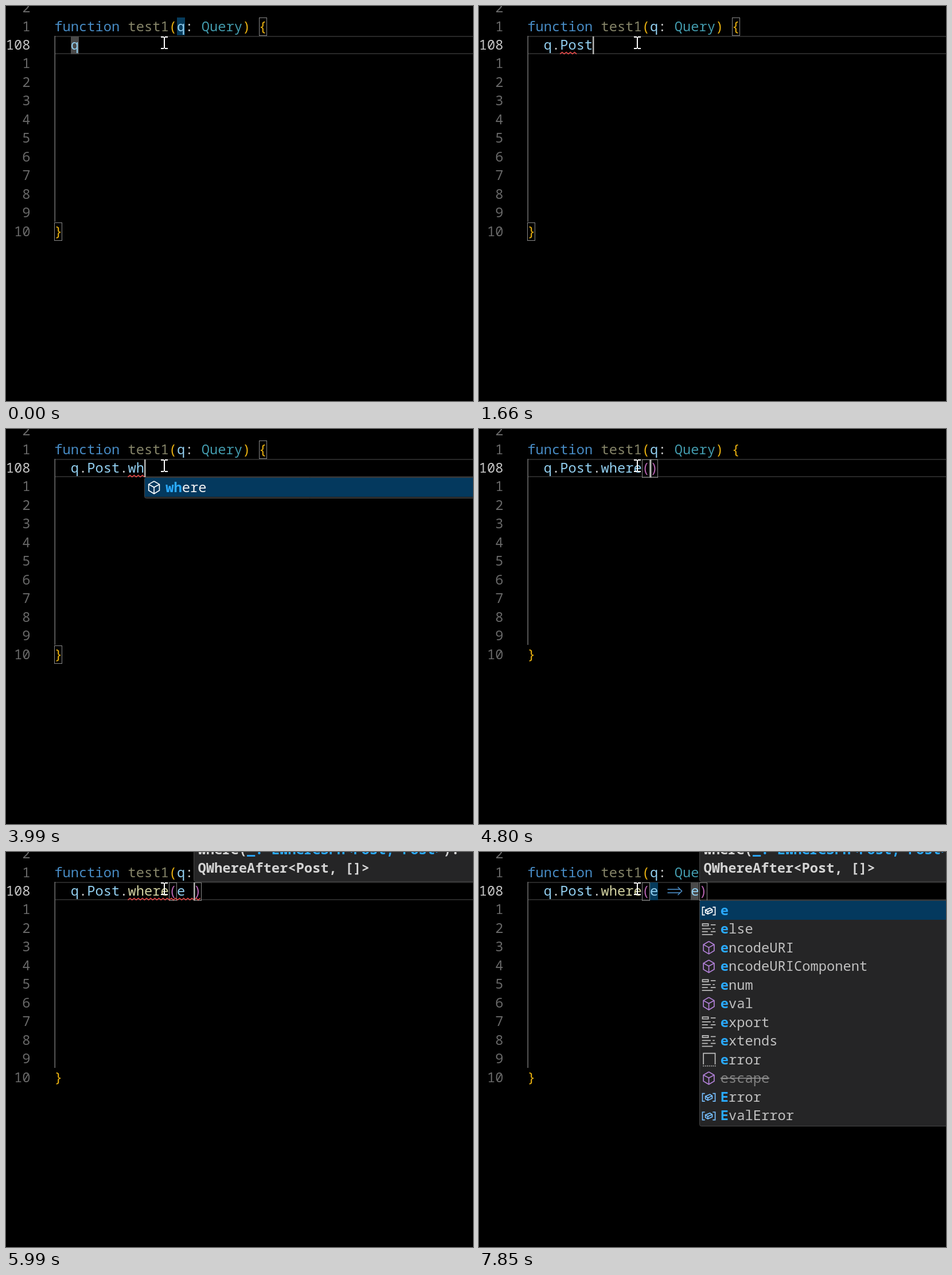
An HTML page with a canvas that plays this animation: 814x688 px, repeating every 8 s.

```html
<!DOCTYPE html>
<html lang="en">
<head>
<meta charset="utf-8">
<title>Editor completion</title>
<style>
  html, body { margin: 0; width: 100%; height: 100%; overflow: hidden; background: #000; }
  canvas { display: block; }
</style>
</head>
<body>
<canvas id="stage" width="814" height="688"></canvas>
<script>
const ctx = document.getElementById('stage').getContext('2d');
const LOOP = 8000, CELL = 14.25, ROW = 32.45, LEFT = 84.3, BASE = 76;
const FONT = '23.75px "Noto Sans Mono", "DejaVu Sans Mono", monospace';
const LIGHT = 200, BOLD = 600;
const BLUE = '#2aaaff', PURPLE = '#b180d7', GOLD = '#e8b010', VAR = '#92cff0', GREY = '#c0c0c0', RED = '#f14c4c';

const methods = ['groupBy', 'limit', 'orderBy', 'select', 'selectDistinct', 'selectFrist', 'where']
  .map(name => ['cube', name]);
const tables = ['Comment', 'Post', 'Tag', 'User'].map(name => ['field', name]);
const words = [
  ['keyword', 'else'], ['cube', 'encodeURI'], ['cube', 'encodeURIComponent'], ['keyword', 'enum'],
  ['cube', 'eval'], ['keyword', 'export'], ['keyword', 'extends'], ['snippet', 'error'],
  ['cube', 'escape'], ['variable', 'Error'], ['variable', 'EvalError']
];
const post = [['field', 'Post']], where = [['cube', 'where']];

// Each step changes part of the editor state and holds until the next one.
const steps = [
  [0, { text: 'q', caret: false, highlight: [-1, 2], used: false, braceError: false, wave: null,
        popup: null, match: 0, signature: false, call: false }],
  [270, { text: 'q.', caret: true, highlight: null, popup: tables }],
  [600, { used: true, braceError: true }],
  [730, { caret: false }],
  [1130, { text: 'q.P', caret: true, popup: post, match: 1 }],
  [1330, { text: 'q.Po', match: 2 }],
  [1660, { text: 'q.Post', popup: null, used: false, braceError: false, wave: [4, 6] }],
  [1930, { wave: null }],
  [2000, { text: 'q.Post.' }],
  [2070, { popup: methods, match: 0 }],
  [2340, { used: true, braceError: true }],
  [2540, { caret: false }],
  [3000, { caret: true }],
  [3460, { text: 'q.Post.w', popup: where, match: 1 }],
  [3660, { text: 'q.Post.wh', match: 2 }],
  [3990, { used: false, braceError: false, wave: [9, 11] }],
  [4070, { text: 'q.Post.whe', match: 3 }],
  [4200, { text: 'q.Post.wher', match: 4 }],
  [4330, { text: 'q.Post.where', match: 5 }],
  [4460, { popup: null }],
  [4600, { wave: null }],
  [4800, { text: 'q.Post.where()' }],
  [4930, { signature: true }],
  [5130, { call: true, wave: [9, 16] }],
  [5260, { caret: false }],
  [5660, { text: 'q.Post.where(e)', caret: true, wave: [9, 17] }],
  [5730, { popup: [...words, ['variable', 'Element']], match: 1 }],
  [5990, { text: 'q.Post.where(e )', popup: null, wave: [9, 18] }],
  [6060, { wave: [15, 16] }],
  [6320, { text: 'q.Post.where(e =)' }],
  [6720, { text: 'q.Post.where(e =>)' }],
  [6790, { wave: [18, 19] }],
  [6920, { used: true }],
  [7120, { text: 'q.Post.where(e => )', wave: [19, 20] }],
  [7320, { text: 'q.Post.where(e => e)', wave: [20, 21] }],
  [7390, { popup: [['variable', 'e'], ...words], match: 1 }],
  [7590, { used: false, wave: null }],
  [7720, { highlight: [0, 20] }],
  [7850, { caret: false }]
];

// Icon strokes on a 16-unit grid, one polyline each.
const icons = {
  cube: [
    [[8, 1.5], [13.5, 4.7], [13.5, 11], [8, 14.3], [2.5, 11], [2.5, 4.7], [8, 1.5]],
    [[2.5, 4.7], [8, 7.7], [13.5, 4.7]], [[8, 7.7], [8, 14.3]]
  ],
  field: [
    [[1.5, 6.4], [9, 2.4], [14.5, 5.2], [14.5, 10], [7, 13.7], [1.5, 11], [1.5, 6.4], [7, 8.8], [14.5, 5.2]],
    [[7, 8.8], [7, 13.7]]
  ],
  variable: [
    [[4, 4.5], [1.5, 4.5], [1.5, 12.5], [4, 12.5]], [[12, 4.5], [14.5, 4.5], [14.5, 12.5], [12, 12.5]],
    [[4.5, 7.5], [9.1, 5.5], [11.5, 7], [11.5, 9.5], [7, 11.5], [4.5, 10], [4.5, 7.5], [7, 9], [11.5, 7]],
    [[7, 9], [7, 11.5]]
  ],
  keyword: [
    [[1.5, 2.5], [7.5, 2.5], [7.5, 4.5], [1.5, 4.5], [1.5, 2]],
    ...[[10, 15, 3.5], [1, 10, 7.5], [12, 14, 7.5], [1, 7, 10.5], [10, 15, 10.5], [1, 12, 13.5]]
      .map(([from, to, y]) => [[from, y], [to, y]])
  ],
  snippet: [
    [[2.5, 13], [2.5, 1.5], [14.5, 1.5], [14.5, 13]],
    ...[2, 4, 6, 8, 10, 12, 14].map(x => [[x, 14.5], [x + 1, 14.5]])
  ]
};
const iconColors = { cube: PURPLE, field: '#75beff', variable: '#75beff' };

const colX = col => LEFT + col * CELL;

function write(text, x, y, color, weight = LIGHT) {
  ctx.font = `${weight} ${FONT}`;
  ctx.fillStyle = color;
  ctx.fillText(text, x, y);
  return x + text.length * CELL;
}

function fill(x, y, w, h, color) {
  ctx.fillStyle = color;
  ctx.fillRect(x, y, w, h);
}

function line(points, color, width = 1.6) {
  ctx.beginPath();
  points.forEach(([x, y]) => ctx.lineTo(x, y));
  ctx.strokeStyle = color;
  ctx.lineWidth = width;
  ctx.stroke();
}

function panel(x, y, h) {
  ctx.beginPath();
  ctx.roundRect(Math.round(x) + .5, y + .5, 900, Math.round(h), 3);
  ctx.fillStyle = '#252526';
  ctx.fill();
  ctx.strokeStyle = '#454545';
  ctx.lineWidth = 1;
  ctx.stroke();
}

function bracketBox(col, row) {
  ctx.strokeStyle = '#888888';
  ctx.lineWidth = 1;
  ctx.strokeRect(Math.round(colX(col)) + .5, Math.round(52.5 + row * ROW) + .5, 13, 31);
}

function squiggle(from, to, row, color) {
  const points = [], end = colX(to);
  for (let x = colX(from), i = 0; x <= end + 1; x += 3.6, i++)
    points.push([x, 82 + row * ROW + (i % 2 ? -1.6 : 1.6)]);
  line(points, color, 1.5);
}

function drawIcon(name, x, y, color) {
  const scale = 1.7;
  for (const stroke of icons[name])
    line(stroke.map(([px, py]) => [x + (px - 8) * scale, y + (py - 8) * scale]), color, scale);
}

function drawPopup(items, match, x) {
  panel(x, 84, items.length * ROW + 3.5);
  fill(Math.round(x) + 1, 85, 814, 33, '#04395e');
  items.forEach(([icon, label], i) => {
    const y = 102 + i * ROW, base = y + 8, textX = x + 37.2;
    drawIcon(icon, x + 17, y, i ? iconColors[icon] || GREY : '#ffffff');
    const retired = label === 'escape';
    const count = retired ? 0 : match;
    const next = write(label.slice(0, count), textX, base, BLUE, BOLD);
    const end = write(label.slice(count), next, base, retired ? '#808080' : i ? GREY : '#f4f4f4');
    if (retired) line([[textX, y], [end, y]], '#999999', 1.5);
  });
}

function drawSignature(x) {
  panel(x, -40, 91);
  let next = write('where(', x + 8, 3.5, '#d4d4d4', BOLD);
  next = write('_: EWhereSFn<Post, Post>', next, 3.5, BLUE, BOLD);
  write('):', next, 3.5, '#d4d4d4', BOLD);
  write('QWhereAfter<Post, []>', x + 8, 36, '#d4d4d4', BOLD);
}

function drawArrow(x) {
  const y = 68, color = '#4d8fc8';
  line([[x + 2, y - 3], [x + 24, y - 3]], color);
  line([[x + 2, y + 3], [x + 24, y + 3]], color);
  line([[x + 20, y - 7], [x + 27, y], [x + 20, y + 7]], color);
}

function drawCode(text, call) {
  let x = colX(2);
  for (const token of text.match(/\w+|=>|./g)) {
    if (token === '=>') {
      drawArrow(x);
      x += 2 * CELL;
      continue;
    }
    const color = call && token === 'where' ? '#d0d0a0'
      : /\w/.test(token) ? VAR
      : /[()]/.test(token) ? '#b864b2' : '#c8c8c8';
    x = write(token, x, BASE, color);
  }
}

function drawGutter() {
  for (let row = -2; row <= 10; row++) {
    const label = row ? String(Math.abs(row)) : '108';
    write(label, 42.5 - label.length * CELL, BASE + row * ROW, row ? '#686868' : '#c6c6c6');
  }
}

function drawPointer() {
  line([[276, 54], [276, 74]], '#ffffff', 2);
  for (const y of [54, 74]) {
    line([[270, y], [275, y]], '#ffffff', 2);
    line([[277, y], [282, y]], '#ffffff', 2);
  }
}

function draw(time) {
  const state = {};
  for (const [start, change] of steps) if (start <= time) Object.assign(state, change);
  const { text, highlight, wave } = state;
  const closed = text.endsWith(')');
  const caretX = colX(2 + text.length - (closed ? 1 : 0));

  fill(0, 0, 814, 688, '#000000');
  fill(85, 52, 729, 2, '#282828');
  fill(85, 82, 729, 2, '#282828');
  fill(84.5, 52, 1.5, 324, '#707070');
  if (highlight) {
    const [row, col] = highlight;
    fill(Math.round(colX(15)), Math.round(52.5 + row * ROW), 14, 31, '#063b5c');
    fill(Math.round(colX(col)), 53, 14, 31, '#4a4a4a');
  }

  drawGutter();
  const header = [['function ', '#478bc4'], ['test1', state.used ? '#d0d0a0' : '#858468'], ['(', GOLD], ['q', VAR],
    [': ', '#c8c8c8'], ['Query', '#429aac'], [') {', GOLD]];
  header.reduce((x, [part, color]) => write(part, x, BASE - ROW, color), LEFT);
  write('}', LEFT, BASE + 10 * ROW, GOLD);
  drawCode(text, state.call);

  if (closed) {
    bracketBox(14, 0);
    bracketBox(1 + text.length, 0);
  } else {
    bracketBox(25, -1);
    bracketBox(0, 10);
  }
  if (wave) squiggle(...wave, 0, RED);
  if (state.braceError) squiggle(0, 1, 10, '#d9702f');
  if (state.caret) fill(Math.round(caretX), 53, 2.5, 31, '#b4b4b2');

  if (state.signature) drawSignature(caretX);
  if (state.popup) drawPopup(state.popup, state.match, caretX);
  drawPointer();
}

function frame() {
  draw(performance.now() % LOOP);
  requestAnimationFrame(frame);
}
frame();
</script>
</body>
</html>
```
